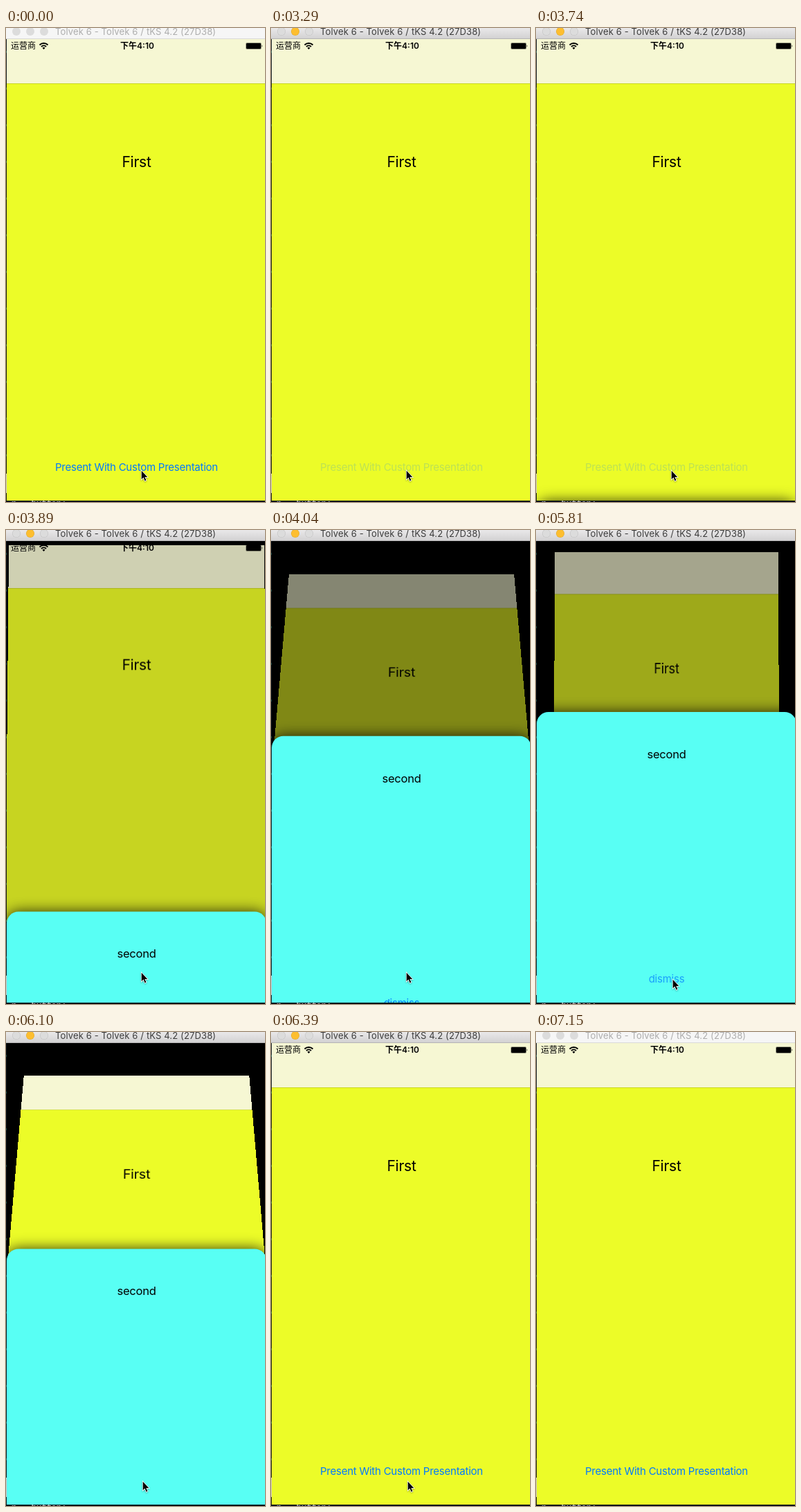
These frames come from a looping animation (374 by 685 pixels, 7250 ms). An HTML page:

```html
<!DOCTYPE html>
<html lang="en">
<head>
<meta charset="utf-8">
<title>Card presentation</title>
<style>
  html, body { margin: 0; width: 100%; height: 100%; overflow: hidden; background: #0b1118; }
  body { font-family: Inter, Roboto, sans-serif; letter-spacing: -.015em; color: #000; }
  div, svg { position: absolute; }
  #stage { left: 0; top: 0; width: 374px; height: 685px; overflow: hidden; }

  /* Slivers of the desktop behind the simulator window */
  #edge { left: 0; top: 16px; width: 1px; height: 667px;
    background: linear-gradient(#0000 628px, #c9c0c4 628px 656px, #0000 656px),
                repeating-linear-gradient(#0000 0 17px, #1d4a46 17px 20px, #0000 20px 53px); }
  #code { left: 8px; top: 683px; width: 90px; height: 2px; overflow: hidden; }
  #code div { top: -3px; white-space: pre; color: #b5b5b5; letter-spacing: 0;
    font: bold 12px/14px "Noto Sans Mono", monospace; }

  #bar { left: 0; top: 0; width: 374px; height: 15px; background: #f6f6f6;
    border-bottom: 1px solid #dadada; color: #adadad; }
  #bar.active { background: linear-gradient(#e9e8e9, #d3d2d3); border-color: #b5b4b5; color: #3c3c3c; }
  .light { top: -1px; width: 12px; height: 12px; border-radius: 50%; background: #dcdcdc; }
  .active .light { box-shadow: inset 0 0 0 .5px #0002; }
  .active .middle { background: #fdbe2f; }
  #title { left: 71px; top: -2px; white-space: nowrap; font-size: 13px; line-height: 15px; letter-spacing: .01em; }

  #device { left: 1px; top: 16px; width: 375px; height: 667px; overflow: hidden; background: #000; }
  #page, #dim { inset: 0; }
  #page { background: #ecfc28; }
  #dim { background: #000; }
  #nav { left: 0; top: 0; width: 375px; height: 64px; background: #f6f7d3 padding-box;
    border-bottom: 1px solid rgba(0, 0, 0, .15); }
  .label { left: 0; width: 375px; text-align: center; line-height: 20px; font-size: 15px; white-space: nowrap; }
  .link { color: #007aff; }
  .status { top: 1px; font: 12px/17px Inter, "Noto Sans CJK SC", "Noto Sans CJK", sans-serif;
    letter-spacing: 0; white-space: nowrap; }
  #sheet { left: 0; top: 0; width: 375px; height: 460px; border-radius: 17px 17px 0 0;
    background: #58fff4; box-shadow: 0 0 20px rgba(0, 0, 0, .8); }
  #cursor { left: 0; top: 0; overflow: visible; filter: drop-shadow(0 1px 1px rgba(0, 0, 0, .3)); }
</style>
</head>
<body>
<div id="stage">
  <div id="edge"></div>
  <div id="code"><div>n = button;</div></div>

  <div id="device">
    <div id="page">
      <div id="nav"></div>
      <div class="label" style="top:168px;font-size:21px">First</div>
      <div class="label link" id="present" style="top:609px">Present With Custom Presentation</div>
    </div>
    <div id="dim"></div>
    <div class="status" style="left:6px">运营商</div>
    <div class="status" style="left:0;width:377px;text-align:center;font-weight:600">下午4:10</div>
    <svg width="375" height="20">
      <path d="M47.5 8.5a8.5 8.5 0 0 1 12 0M50 11a5 5 0 0 1 7 0" fill="none" stroke="#000" stroke-width="1.9"/>
      <path d="M53.5 15l-2-2.2a2.9 2.9 0 0 1 4 0z"/>
      <rect x="345.5" y="5.5" width="22" height="9" rx="1.5" fill="none" stroke="#000" stroke-opacity=".35"/>
      <rect x="346" y="6" width="21" height="8" rx="1"/>
      <path d="M368.5 8.2q1.6 1.8 0 3.6z"/>
    </svg>
    <div id="sheet">
      <div class="label" style="top:51px;font-size:16.5px">second</div>
      <div class="label link" id="dismiss" style="top:376px">dismiss</div>
    </div>
  </div>

  <div id="bar">
    <div class="light" style="left:9px"></div>
    <div class="light middle" style="left:29px"></div>
    <div class="light" style="left:49px"></div>
    <div id="title">Tolvek 6 - Tolvek 6 / tKS 4.2 (27D38)</div>
  </div>

  <svg id="cursor" width="12" height="18">
    <path d="M.7.8V13.2L3.5 10.6 5.6 15.4 7.4 14.6 5.3 10H9.2Z" stroke="#fff" stroke-width="1.5" paint-order="stroke"/>
  </svg>
</div>

<script>
const LOOP = 7250;
const PRESS = 3290, SHOW = 3738, PRESS_DISMISS = 5200, DISMISS = 5655, HIDE = 6385, BLUR = 7150;
const FRAME = 147.2;                      // the screen is refreshed in visible steps
const SHEET_CLOSED = 668, SHEET_OPEN = 247;

const el = id => document.getElementById(id);

// Ease-in-out from 0 to 1, beginning at start
function ease(t, start, duration) {
  const u = Math.min(1, Math.max(0, (t - start) / duration));
  return (1 - Math.cos(Math.PI * u)) / 2;
}

function render(time) {
  const t = SHOW + Math.floor((time - SHOW) / FRAME) * FRAME;

  // The page tilts back, then shrinks flat; dismissing plays this in reverse
  const grow = ease(t, DISMISS, 360);
  const shrink = ease(t, SHOW + 381, 340) - grow;
  const tilt = ease(t, SHOW + 98, 240) - ease(t, DISMISS + 392, 240);
  const scaleX = 1 - .2 * shrink;
  const scaleY = 1 - .013 * tilt - .037 * shrink;
  const perspective = -.0005 * tilt * (1 - shrink) ** 2.5;
  el('page').style.transform =
    `matrix3d(${scaleX},0,0,0, 0,${scaleY},0,${perspective.toFixed(7)}, 0,0,1,0, 0,0,0,1)`;

  const slideIn = ease(t, SHOW + 19, 338);
  const slide = slideIn - ease(t, DISMISS + 355, 370);
  el('dim').style.opacity = .5 * (slideIn - grow);
  el('sheet').style.transform = `translateY(${SHEET_CLOSED + (SHEET_OPEN - SHEET_CLOSED) * slide}px)`;
  el('sheet').style.visibility = time >= SHOW && time < HIDE ? 'visible' : 'hidden';

  el('bar').className = time >= PRESS && time < BLUR ? 'active' : '';
  el('present').style.opacity = time >= PRESS && time < HIDE ? .2 : 1;
  el('dismiss').style.opacity = t >= PRESS_DISMISS ? .2 + .8 * ease(t, DISMISS, 240) : 1;

  // The pointer hops onto the dismiss button, then speeds off the stage
  const hop = t >= 4760 ? 1 : 0;
  const leave = .004 * Math.max(0, t - 6520) ** 2;
  el('cursor').style.transform = `translate(${195 + 2 * hop + leave}px, ${639 + 10 * hop + .32 * leave}px)`;
}

const start = performance.now();
function tick() {
  render((performance.now() - start) % LOOP);
  requestAnimationFrame(tick);
}
tick();
</script>
</body>
</html>
```
